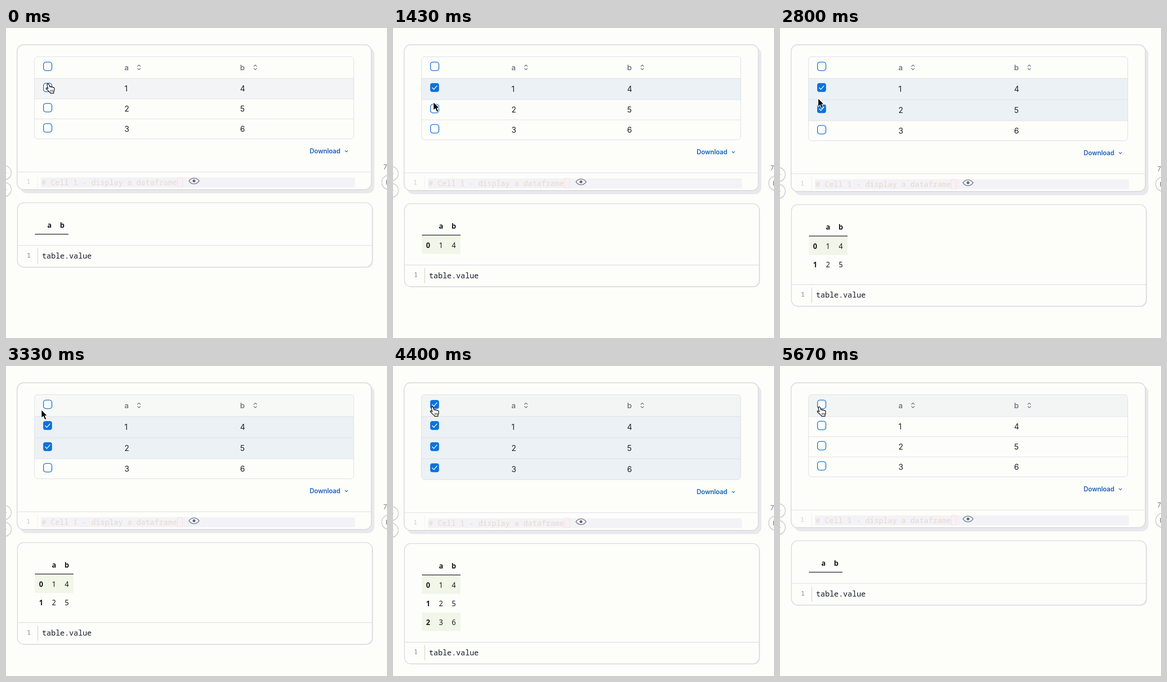
Recreate the animation shown at these times as an HTML page. Size 830x675 px, loop 6210 ms.

```html
<!DOCTYPE html>
<html lang="en">
<head>
<meta charset="utf-8">
<title>Selectable table</title>
<style>
  html, body { margin: 0; width: 100%; height: 100%; overflow: hidden; background: #fdfdfa; }
  svg { display: block; }
  text { font-family: Inter, sans-serif; white-space: pre; }
  .cell { font-size: 17px; fill: #1c2024; }
  .head { font-size: 16.5px; font-weight: 500; fill: #656a76; }
  .link { font-size: 13.8px; font-weight: 600; fill: #1760b8; }
  .code { font: 16.4px "Noto Sans Mono", monospace; fill: #171a28; }
  .num { font: 14px "Noto Sans Mono", monospace; fill: #808489; }
  .df { font: 15.5px "Noto Sans", "Open Sans", sans-serif; text-anchor: middle; fill: #15181d; }
  .bold { font-weight: 700; }
  .icon { fill: none; stroke-linecap: round; stroke-linejoin: round; }
</style>
</head>
<body>
<svg id="stage" width="830" height="675" viewBox="0 0 830 675"></svg>
<script>
const LOOP = 6210, FADE = 150, DF_LAG = 130;
const CLEAR = 5290;
const CHECKED_AT = [430, 1760, 3850];
const HEAD_AT = 3850;
const PAPER = '#fdfdfa', EDGE = '#dbdadf', RULE = '#dcdce4', BLUE = '#0d72dc';
// Pointer keys: time, x, y
const PATH = [
  [0, 92.5, 121.5], [1100, 92.5, 121.5], [1430, 88, 161], [1620, 85.5, 177.5],
  [2500, 85.5, 177.5], [3330, 77, 95], [3560, 86.5, 89]
];
// Hover changes: time, row (-1 is the header)
const HOVERS = [[-FADE, 0], [1420, 1], [2870, 0], [3250, -1]];
const HAND = 'M-3 2.5C-3.6-.2 .2-1 1 1.5L3 7C3.5 5.5 6 5.5 6.5 7.5C7.5 6 9.5 6.5 10 8.5C11.5 7.5 13 8.5 13 10.5C13.5 14 13 15.5 11.5 18V20.5H4.5L3.5 19C1 16.5-2 14-4.5 11.5C-6.5 9-4.5 8-2.5 9.5L-1 11Z';
const ARROW = 'M0 0V18.5L4.3 14.6L7.5 22L11 20.6L7.9 13.4H13.2Z';

const stage = document.getElementById('stage');
const clamp = v => Math.max(0, Math.min(1, v));
const smooth = v => v * v * (3 - 2 * v);
const fade = (t, from) => clamp((t - from) / FADE);

const text = (cls, x, y, s) => `<text class="${cls}" x="${x}" y="${y}">${s}</text>`;
const rect = (x, y, w, h, attrs) => `<rect x="${x}" y="${y}" width="${w}" height="${h}" ${attrs}/>`;
const line = (x1, y1, x2, y2, color, w = 1) =>
  `<path d="M${x1} ${y1}L${x2} ${y2}" stroke="${color}" stroke-width="${w}"/>`;
const icon = (d, color, w) => `<path class="icon" d="${d}" stroke="${color}" stroke-width="${w}"/>`;
const move = (x, y, s) => `<g transform="translate(${x} ${y})">${s}</g>`;
const circle = (x, y) => `<circle cx="${x}" cy="${y + 1}" r="16" fill="#e2e1e6"/>
  <circle cx="${x}" cy="${y}" r="15.5" fill="${PAPER}" stroke="#c4c3ca" stroke-width="1.3"/>`;

const checkbox = (y, on) => on
  ? rect(81, y - 9.5, 19.3, 19.3, `rx="4.5" fill="${BLUE}"`) + icon(`M85.5 ${y + .5}l3.4 3.7 6.8-7.7`, '#fff', 1.5)
  : rect(81.7, y - 9.2, 18.2, 18.4, `rx="5" fill="${PAPER}" stroke="#1c76d2" stroke-width="1.6"`);

function pointerAt(t) {
  const i = PATH.findIndex(k => k[0] > t);
  if (i < 0) return PATH.at(-1).slice(1);
  const [t0, x0, y0] = PATH[i - 1], [t1, x1, y1] = PATH[i];
  const p = smooth((t - t0) / (t1 - t0));
  return [x0 + (x1 - x0) * p, y0 + (y1 - y0) * p];
}

function hoverAt(t, row) {
  let v = 0;
  HOVERS.forEach(([from, r], i) => {
    if (r !== row) return;
    const end = HOVERS[i + 1]?.[0] ?? Infinity;
    v = Math.max(v, fade(t, from) * (1 - fade(t, end)));
  });
  return v;
}

function dataTable(rows, headOn, t) {
  const bottom = rows[2].top + rows[2].h;
  const fill = (y, h, color, a) => a ? rect(62, y, 695, h, `fill="${color}" opacity="${a}"`) : '';
  let s = `<clipPath id="round">${rect(62, 62, 695.5, bottom - 62, 'rx="7"')}</clipPath><g clip-path="url(#round)">`;
  s += fill(62, 47.5, '#f3f5f5', hoverAt(t, -1));
  rows.forEach((r, i) => {
    s += fill(r.top, r.h, '#f3f4f6', hoverAt(t, i)) + fill(r.top, r.h, '#ebf1f4', r.shade);
    s += line(62, r.top + .5, 757, r.top + .5, RULE);
  });
  s += '</g>' + rect(62, 62.5, 695.5, bottom - 62.5, `rx="7" fill="none" stroke="${RULE}"`);
  s += checkbox(83.5, headOn);
  [['a', 258, 289.7], ['b', 510, 543]].forEach(([name, x, ix]) => {
    s += text('head', x, 92, name) + icon(`M${ix - 3} 83.5l3-3 3 3M${ix - 3} 88l3 3 3-3`, '#656a76', 1.3);
  });
  rows.forEach((r, i) => {
    const y = r.top + r.h / 2 + 6;
    s += checkbox(r.top + 20, r.on) + text('cell', 258, y, i + 1) + text('cell', 510, y, i + 4);
  });
  return s;
}

function editor() {
  return text('link', 661.5, 273, 'Download') + icon('M738.8 267l2.7 2.7 2.7-2.7', '#1760b8', 1.3)
    + line(25, 313.5, 795, 313.5, RULE)
    + rect(76, 325.5, 684, 21.5, 'fill="#f3f2f7"')
    + line(69, 320, 69, 350, '#eeeee8')
    + `<g opacity=".4">${text('num', 44.5, 339, '1')}</g>`
    + `<text class="code" x="77.5" y="341.5" style="fill:#e8d8cc"># Cell 1 - display a dataframe</text>`
    + rect(373.5, 325.5, 11, 21, 'fill="#f9f0f3" stroke="#f6e0e5"')
    + icon('M398.5 333C404 324.5 415 324.5 420.8 333C415 341.5 404 341.5 398.5 333Z', '#6f7b8c', 1.5)
    + '<circle cx="409.6" cy="333" r="3" fill="#5f6b7c"/>';
}

function sideButtons() {
  return circle(-4, 315) + circle(-4, 351.5) + circle(834, 336)
    + line(-8, 315, 1, 315, '#8b9098', 1.4) + line(-8, 351.5, 1, 351.5, '#8b9098', 1.4)
    + line(829, 331, 829, 341, '#70757d', 1.4)
    + '<text x="822" y="308" font-size="14" fill="#747982">7</text>';
}

function resultCell(n) {
  const grow = n * 40.6, shift = n ? 10 : 0, right = n ? 147 : 136;
  let s = rect(26.5, 382.5, 773, 139.5 + grow, 'rx="14" fill="#e6e5e9"')
    + rect(24.8, 380.5, 773, 140 + grow, `rx="14" fill="${PAPER}" stroke="${EDGE}" stroke-width="1.6"`)
    + text('df bold', 94.8 + shift, 435, 'a') + text('df bold', 122.3 + shift, 435, 'b')
    + line(63, 449, right, 449, '#25252f', 1.5);
  for (let i = 0; i < n; i++) {
    const y = 450 + i * 40.5;
    if (i % 2 === 0) s += rect(63, y, 84, 40, 'fill="#f1f6e8"');
    s += text('df bold', 76.5, y + 26.7, i) + text('df', 104.5, y + 26.7, i + 1) + text('df', 132.5, y + 26.7, i + 4);
  }
  return s + line(26, 473.5 + grow, 797, 473.5 + grow, RULE, 1.2)
    + move(0, grow, line(69.3, 480, 69.3, 513, '#d6dccb', 1.6)
      + text('num', 45.5, 499.5, '1') + text('code', 78.5, 502, 'table.value'));
}

function pointer(x, y, boxes) {
  const over = x > 81 && x < 100 && boxes.some(b => Math.abs(y - b) < 9.5);
  return move(x, y, over
    ? `<path d="${HAND}" fill="#fff" stroke="#111" stroke-width="1.4" stroke-linejoin="round"/>`
      + icon('M5 13.5V17M7.5 13.5V17M10 13.5V17', '#111', 1)
    : `<path d="${ARROW}" fill="#000" stroke="#fff" stroke-width="1.2"/>`);
}

function draw(t) {
  let top = 109.5;
  const rows = CHECKED_AT.map(from => {
    const on = t >= from && t < CLEAR;
    const row = { top, on, h: on ? 46 : 44, shade: fade(t, from + 20) * (1 - fade(t, CLEAR)) };
    top += row.h;
    return row;
  });
  const drop = top - 241.5;
  const listed = t < CLEAR + DF_LAG ? CHECKED_AT.filter(from => t >= from + DF_LAG).length : 0;
  const headOn = t >= HEAD_AT && t < CLEAR;
  const [x, y] = pointerAt(t);
  stage.innerHTML = rect(31, 43, 771.5, 317 + drop, 'rx="14" fill="#e9e8ec"')
    + rect(24.3, 36.5, 771.5, 315.5 + drop, `rx="14" fill="${PAPER}" stroke="${EDGE}" stroke-width="1.8"`)
    + dataTable(rows, headOn, t)
    + move(0, drop, editor() + sideButtons() + resultCell(listed))
    + pointer(x, y, [83.5, ...rows.map(r => r.top + 20)]);
}

function tick() {
  draw(performance.now() % LOOP);
  requestAnimationFrame(tick);
}
tick();
</script>
</body>
</html>
```
